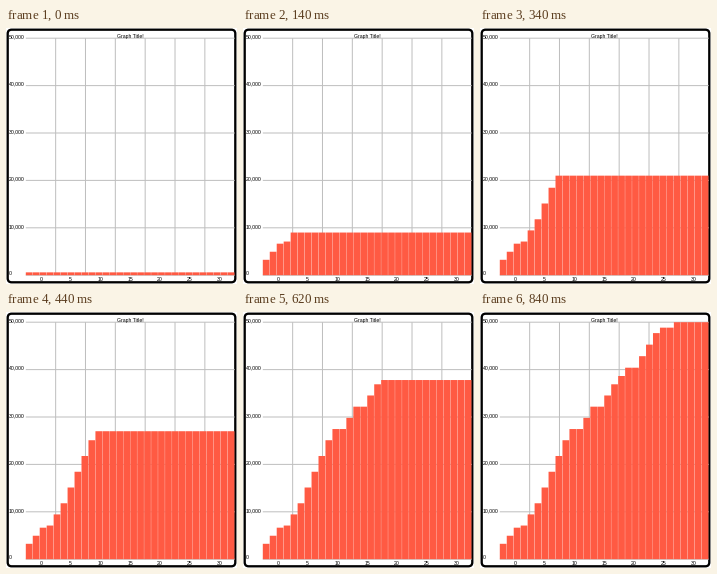
A matplotlib script for the animation above (1000 ms loop, 231x256 px).

```python
import matplotlib.pyplot as plt
import numpy as np
from matplotlib.animation import FuncAnimation
from matplotlib.patches import FancyBboxPatch

W, H, DPI = 231, 256, 100
PX = 72 / DPI
LEFT, RIGHT, TOP, BASE = 19.8, 228.7, 10.2, 247.2
BARS, COLUMNS, MAX_VALUE = 30, 7, 50000
START, STEP = 600, 1200  # shared rising limit: first value and growth per frame
FRAMES, INTERVAL = 50, 20

# The data climbs along a bent line and pauses for one bar at each rest.
RESTS = (11, 14, 19, 24)
CURVE = [(0, 3250), (2, 6650), (3, 7100), (5, 11800), (9, 25100),
         (14, 36900), (16, 40400), (19, 47700), (21, MAX_VALUE)]

plt.rcParams["font.family"] = "Liberation Sans"
fig = plt.figure(figsize=(W / DPI, H / DPI), dpi=DPI, facecolor="white")
ax = fig.add_axes([0, 0, 1, 1])
ax.axis("off")


def data_value(bar):
    climbed = bar - sum(rest <= bar for rest in RESTS)
    return np.interp(climbed, *zip(*CURVE))


def to_pixels(value):
    return value / MAX_VALUE * (BASE - TOP)


def label(x, y, text, align="center"):
    ax.text(x, y, text, size=5.1 * PX, color="black", ha=align,
            va="baseline", zorder=4)


def grid_line(xs, ys):
    ax.plot(xs, ys, color="#bfbfbf", lw=PX, zorder=1, snap=False,
            solid_capstyle="butt")


ax.add_patch(FancyBboxPatch(
    (1.7, 1.7), W - 3.4, H - 3.4, boxstyle="round,pad=0,rounding_size=4",
    fc="white", ec="black", lw=2.3 * PX, zorder=0))

for value in range(0, MAX_VALUE + 1, 10000):
    y = BASE - to_pixels(value)
    grid_line((LEFT, RIGHT), (y, y))
    label(3, y, f"{value:,}", "left")

column = (RIGHT - LEFT) / COLUMNS
for i in range(COLUMNS):
    x = LEFT + i * column
    if i:
        grid_line((x, x), (TOP, BASE))
    label(x + column / 2, 253, str(5 * i))

label(124.8, 10, "Graph Title!")

values = [data_value(i) for i in range(BARS)]
pitch = (RIGHT - LEFT) / BARS
bars = ax.bar(LEFT + pitch * np.arange(BARS), 0, width=pitch - 0.25,
              bottom=BASE, align="edge", color="#ff5a43", lw=0, zorder=2,
              snap=False)
ax.set(xlim=(0, W), ylim=(H, 0))


def update(frame):
    limit = START + STEP * frame
    for bar, value in zip(bars, values):
        bar.set_height(-to_pixels(min(value, limit)))
    return list(bars)


anim = FuncAnimation(fig, update, frames=FRAMES, interval=INTERVAL,
                     repeat=True, repeat_delay=0, blit=False)
plt.show()
```
